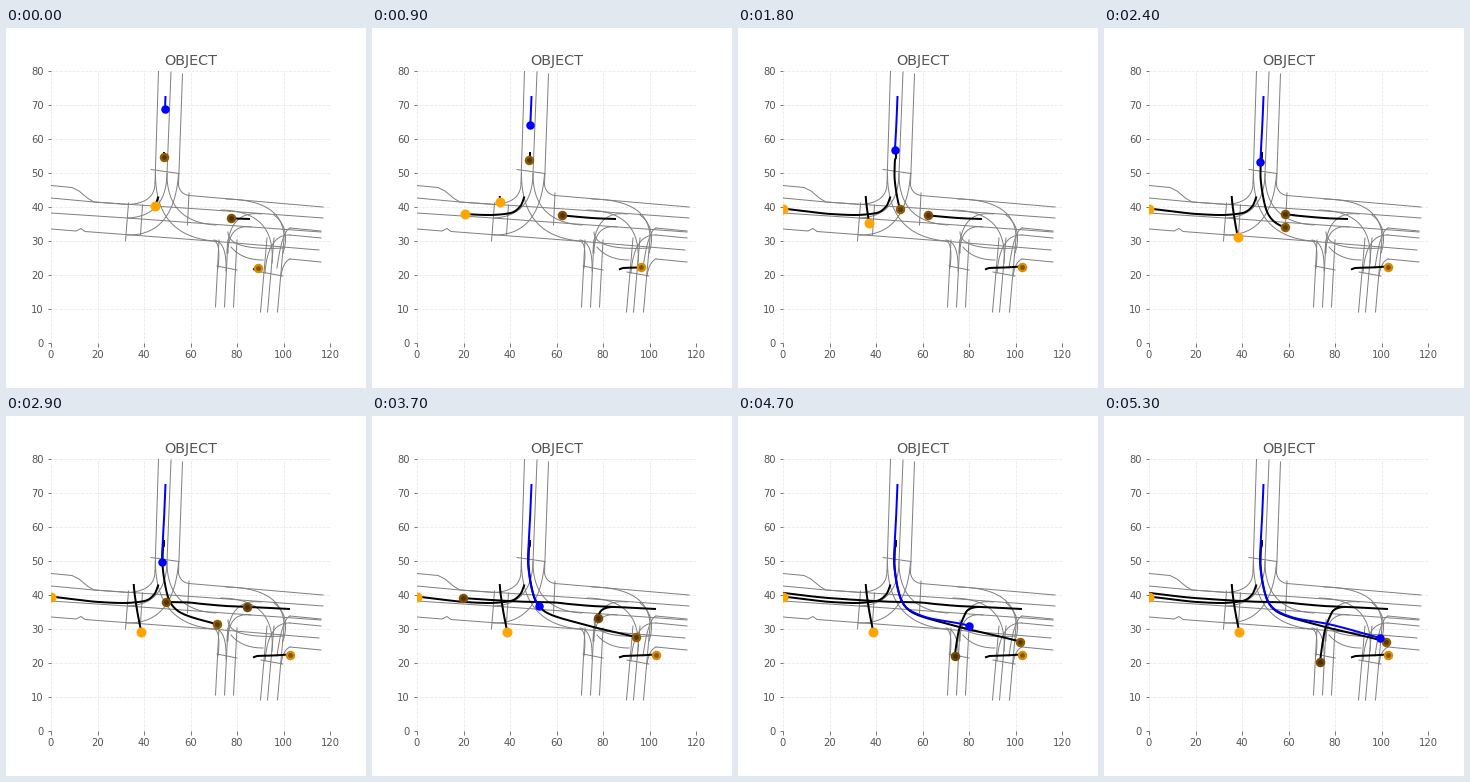
Recreate the animation shown at these times as a matplotlib script. Size 360 px wide and 360 px high, loop 5.4 s.

```python
import matplotlib.pyplot as plt
import numpy as np
from matplotlib.animation import FuncAnimation

SIZE, DPI = 360, 72
FRAMES, INTERVAL = 54, 100
LEFT, RIGHT, BOTTOM, TOP = 45, 324, 315, 43.2
X_MAX, Y_MAX = 120, 80
INK = "#555555"
ORANGE = np.array([1, 0.647, 0])


# All points are in stage pixels, measured from the top left.
def to_data(points):
    x, y = np.asarray(points, float).T
    return ((x - LEFT) / (RIGHT - LEFT) * X_MAX,
            (BOTTOM - y) / (BOTTOM - TOP) * Y_MAX)


def monotone(t, keys, values):
    """Cubic interpolation that never overshoots its keys."""
    step = np.diff(keys)
    slope = np.diff(values) / step
    grad = np.concatenate([slope[:1], np.zeros(len(slope) - 1), slope[-1:]])
    for i in range(1, len(slope)):
        a, b = slope[i - 1], slope[i]
        if a * b > 0:
            grad[i] = 2 * a * b / (a + b)
    t = np.clip(t, keys[0], keys[-1])
    i = np.clip(np.searchsorted(keys, t, "right") - 1, 0, len(step) - 1)
    h, u = step[i], (t - keys[i]) / step[i]
    return ((1 + 2 * u) * (1 - u) ** 2 * values[i] + u * (1 - u) ** 2 * h * grad[i]
            + u * u * (3 - 2 * u) * values[i + 1] + u * u * (u - 1) * h * grad[i + 1])


class Agent:
    """A marker that follows (frame, x, y) keys and leaves its path behind."""

    def __init__(self, ax, keys, size, color, line="black", core=None, z=3):
        self.keys = np.array(keys, float)
        self.trail, = ax.plot([], [], color=line, lw=2, zorder=z,
                              solid_capstyle="butt")
        self.dots = [ax.plot([], [], "o", ms=size, color=color, mew=0, zorder=z + 3)[0]]
        if core is not None:
            self.dots.append(ax.plot([], [], "o", ms=size * 0.5, color=core,
                                     mew=0, zorder=z + 3)[0])

    def update(self, frame):
        t, x, y = self.keys.T
        if frame < t[0]:
            path = np.empty((0, 2))
        else:
            now = np.linspace(t[0], frame, int((frame - t[0]) * 4) + 2)
            path = np.column_stack([monotone(now, t, x), monotone(now, t, y)])
        px, py = to_data(path)
        self.trail.set_data(px, py)
        for dot in self.dots:
            dot.set_data(px[-1:], py[-1:])


def car(ax, keys, shade):
    return Agent(ax, keys, 9.5, ORANGE * shade, core=ORANGE * shade * 0.6)


def lane(ax, points):
    ax.plot(*to_data(points), color="gray", lw=1, zorder=2)


def turn(ax, x0, y0, cx, cy, x1, y1):
    """Lane bend as a quadratic curve."""
    u = np.linspace(0, 1, 30)[:, None]
    lane(ax, (1 - u) ** 2 * np.array([x0, y0]) + 2 * u * (1 - u) * np.array([cx, cy])
         + u * u * np.array([x1, y1]))


fig = plt.figure(figsize=(SIZE / DPI, SIZE / DPI), dpi=DPI, facecolor="white")
ax = fig.add_axes([LEFT / SIZE, 1 - BOTTOM / SIZE,
                   (RIGHT - LEFT) / SIZE, (BOTTOM - TOP) / SIZE])
ax.set(xlim=(0, X_MAX), ylim=(0, Y_MAX))
ax.set_xticks(range(0, X_MAX + 1, 20))
ax.set_yticks(range(0, Y_MAX + 1, 10))
ax.set_title("OBJECT", fontsize=14.4, color=INK)
ax.tick_params(labelsize=10, color=INK, labelcolor=INK)
ax.grid(color="#e9e9e9", ls="--", lw=0.8)
ax.set_axisbelow(True)
for spine in ax.spines.values():
    spine.set_visible(False)

# West-east road
lane(ax, [(45, 157.5), (66, 159.5), (73, 163), (82, 170.5), (88, 174), (122, 176.5)])
lane(ax, [(45, 170), (88, 174), (200, 181.5), (317, 190)])
lane(ax, [(45, 185), (121, 190), (315, 204)])
lane(ax, [(45, 201), (70, 203), (75, 200.5), (79, 203.5), (205, 213), (313, 222)])
lane(ax, [(183, 167.5), (317, 179)])
for y in (200, 207, 231):
    lane(ax, [(284, y), (315, y + 3)])

# North and south arms
for x0, y0, x1, y1 in [(152.5, 43, 149, 155), (165, 44, 161, 146), (176.5, 46, 172.5, 157)]:
    lane(ax, [(x0, y0), (x1, y1)])
for x in (213, 222, 231):
    lane(ax, [(x, 212), (x - 3.5, 279)])
for x in (261, 268, 278):
    lane(ax, [(x, 210), (x - 6.5, 284)])

stop_lines = [(122.5, 175, 119.5, 213), (136.5, 177, 134.5, 207), (183, 165, 181.5, 197),
              (145, 141.5, 173, 145.5), (211, 238, 231, 242), (255, 244, 277, 248)]
for x0, y0, x1, y1 in stop_lines:
    lane(ax, [(x0, y0), (x1, y1)])

west_turns = [
    (149, 155, 149, 175, 122, 176.5),
    (161, 146, 160, 188, 122, 190),
    (161, 146, 161, 194, 210, 197),
    (149.5, 145, 149, 208, 208, 213),
    (172.5, 146, 168, 208, 121, 207),
    (172.5, 157, 174, 166, 183, 167.5),
]
east_turns = [
    (220, 171, 277, 172, 278, 209),
    (215, 182, 270, 183, 266, 235),
    (255, 186, 222, 182, 221, 225),
    (245, 199, 222, 196, 222, 225),
    (284, 200, 276, 203, 271, 240),
    (284, 207, 262, 206, 259, 245),
    (208, 212, 221, 214, 220, 243),
    (208, 213, 215, 215, 212, 240),
    (225, 219, 236, 232, 257, 232),
    (222, 204, 222, 223, 278, 220),
    (284, 231, 277, 234, 275, 248),
    (277, 225, 285, 200, 268, 187),
]
for bend in west_turns + east_turns:
    turn(ax, *bend)

westbound = car(ax, [(-5, 244, 191), (0, 225, 190.3), (9, 190, 187.3), (20, 190, 187.2),
                     (24, 181, 186.4), (29, 159.5, 186), (37, 90.5, 182),
                     (41, 54, 178), (44, 26, 174.5)], 0.5)
eastbound = car(ax, [(-3, 158, 124), (0, 158, 129), (9, 157, 132), (13, 156.5, 147),
                     (18, 162, 181), (22, 172, 195), (29, 211, 208.3),
                     (37, 264, 221), (41, 282, 225.5)], 0.57)
southbound = car(ax, [(25, 284, 193), (29, 241, 191), (33, 230, 194), (37, 225.5, 201.5),
                      (41, 220.5, 216), (48, 216.5, 242), (53, 216, 246)], 0.45)
parking = car(ax, [(-2, 247, 241.5), (0, 251.5, 240), (9, 268.5, 239.4),
                   (18, 283.5, 238.5)], 0.85)
cyclist = Agent(ax, [(-2, 152.5, 168.5), (0, 148.5, 178), (3, 138.5, 185), (6, 117, 187),
                     (9, 93, 186), (12, 68, 183.3), (15, 45, 180.5)], 10, ORANGE)
walker = Agent(ax, [(7, 127.7, 168), (9, 128.2, 174), (18, 131.2, 195),
                    (27, 135.3, 216)], 10, ORANGE)
ego = Agent(ax, [(-7, 159.5, 68), (0, 159, 81), (9, 158.3, 97), (18, 157, 122),
                 (29, 156, 146), (33, 158.5, 167), (37, 167, 190), (41, 189, 201.5),
                 (46, 224, 208), (53, 276, 222)], 8.5, "blue", line="blue", z=4)
agents = [westbound, eastbound, southbound, parking, cyclist, walker, ego]


def draw(frame):
    for agent in agents:
        agent.update(frame)


anim = FuncAnimation(fig, draw, frames=FRAMES, interval=INTERVAL,
                     repeat=True, repeat_delay=0)
plt.show()
```
